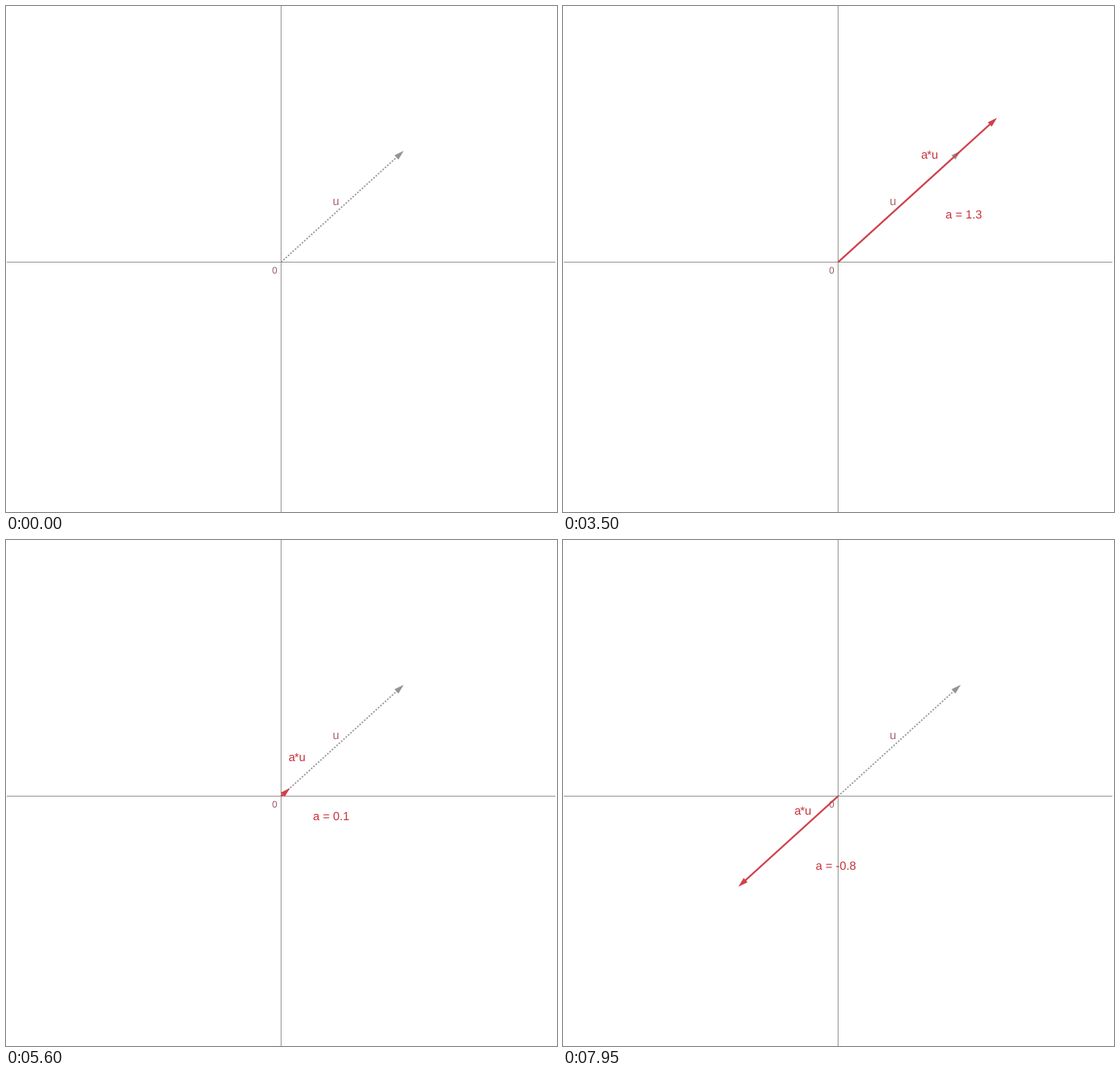
Recreate the animation shown at these times as a matplotlib script. Size 700x643 px, loop 8000 ms.

```python
import numpy as np
import matplotlib.pyplot as plt
from matplotlib.animation import FuncAnimation
from matplotlib.patches import Polygon

W, H, DPI = 700, 643, 100
STEP, LOOP = 50, 8000
PX = 72 / DPI  # points per pixel

GRAY, RED, TEXT_RED = "#949494", "#d0404a", "#c8303a"
ORIGIN = np.array([349.5, 325.5])
U = np.array([155.8, -141.5])

# Scale factor over time: hold, rise, long fall, rise again
KEY_T = [2900, 3500, 3700, 4230, 7045, 7950]
KEY_A = [1, 1.296, 1.425, 1.98, -1.94, -0.8135]
FADE_T = [1150, 2150]

plt.rcParams["font.family"] = "Liberation Sans"
plt.rcParams["text.hinting"] = "none"
fig = plt.figure(figsize=(W / DPI, H / DPI), dpi=DPI, facecolor="white")
ax = fig.add_axes([0, 0, 1, 1])
ax.set_xlim(0, W)
ax.set_ylim(H, 0)
ax.axis("off")


def label(x, y, text, size, color, z):
    return ax.text(x, y, text, fontsize=size * PX, color=color,
                   ha="left", va="baseline", zorder=z)


def axis_line(xs, ys):
    ax.plot(xs, ys, color=GRAY, lw=PX, zorder=1, snap=False,
            solid_capstyle="butt")


class Arrow:
    """Line from the origin with a triangular head."""

    def __init__(self, color, width, z, **style):
        self.line, = ax.plot([], [], color=color, lw=width * PX, zorder=z, **style)
        self.head = Polygon(np.zeros((3, 2)), closed=True, fc=color,
                            ec="none", zorder=z)
        ax.add_patch(self.head)

    def aim(self, vec):
        length = np.hypot(*vec)
        d = vec / max(length, 1e-6)
        n = np.array([-d[1], d[0]])
        tip = ORIGIN + vec
        end = ORIGIN + d * max(length - 9, 0)
        self.line.set_data(*zip(ORIGIN, end))
        self.head.set_xy([tip, tip - 12.5 * d + 3.7 * n,
                          tip - 12.5 * d - 3.7 * n])

    def set_alpha(self, alpha):
        self.line.set_alpha(alpha)
        self.head.set_alpha(alpha)


axis_line([1, 698], [325.5, 325.5])
axis_line([349.5, 349.5], [0, H])
label(338, 340, "0", 12, "#985a62", 2)
label(414, 254, "u", 15, "#a8686e", 2)

base = Arrow(GRAY, 1.8, 3, linestyle=(0, (1.1, 1.1)), dash_capstyle="butt")
base.aim(U)
scaled = Arrow(RED, 2.2, 4, solid_capstyle="butt")
name = label(0, 0, "a*u", 15, TEXT_RED, 5)
value = label(0, 0, "", 15, TEXT_RED, 5)


def draw(i):
    t = i * STEP
    a = np.interp(t, KEY_T, KEY_A)
    alpha = np.interp(t, FADE_T, [0, 1])

    scaled.aim(a * U)
    shift = (a - 1) * U / 2
    side = np.array([4, 6]) if a < 0 else np.zeros(2)
    name.set_position(np.array([431, 215]) + shift + side)
    value.set_position(np.array([462.7, 290.6]) + shift)
    value.set_text(f"a = {round(a, 1) + 0.0:g}")

    for part in (scaled, name, value):
        part.set_alpha(alpha)
    return scaled.line, scaled.head, name, value


anim = FuncAnimation(fig, draw, frames=LOOP // STEP, interval=STEP,
                     repeat=True, repeat_delay=0, blit=False)
plt.show()
```
